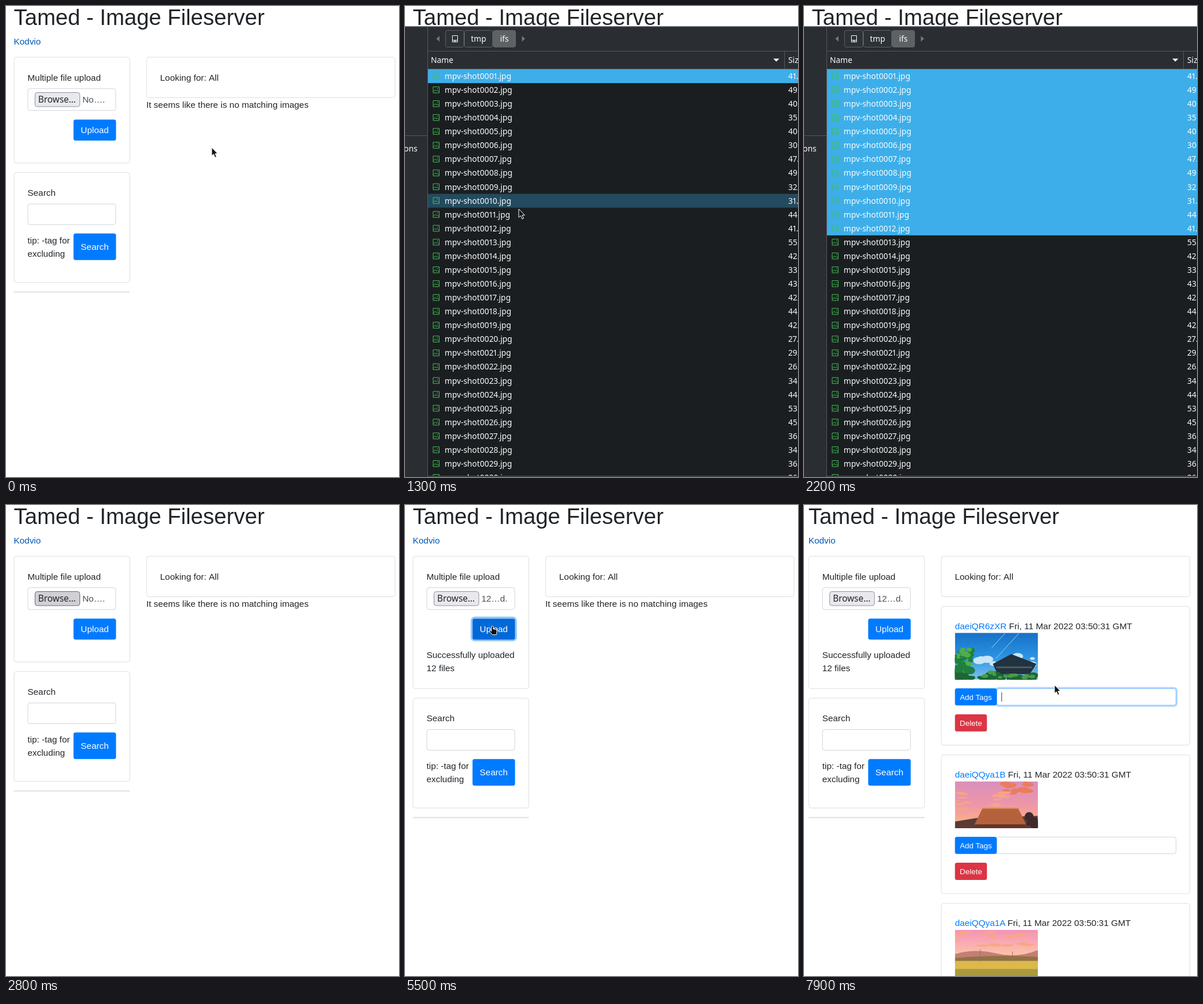
Animation, 684 px wide and 819 px high, one loop 8 s. Source, as an HTML page:

```html
<!DOCTYPE html>
<html lang="en">
<head>
<meta charset="utf-8">
<title>Image Fileserver</title>
<style>
  html, body { margin: 0; width: 100%; height: 100%; overflow: hidden; background: #fff; }
  svg { display: block; }
  text { font: 15.4px "Liberation Sans", Arial, sans-serif; fill: #212529; white-space: pre; }
  .title { font-size: 38.5px; }
  .small { font-size: 13.48px; }
  .white { fill: #fff; }
  .mid { text-anchor: middle; }
  .link { fill: #007bff; }
  .visited { fill: #0056b3; }
  .muted { fill: #495057; }
  .noto { font-family: "Noto Sans", sans-serif; }
  .dlg { font: 13.85px "Noto Sans", sans-serif; font-variant-numeric: proportional-nums; fill: #fcfcfc; }
</style>
</head>
<body>
<svg id="stage" width="684" height="819"></svg>
<script>
const LOOP = 8000, STEP = 100;
const ROWS = 30, ROW_TOP = 110, ROW_H = 24.07;
const CARD_PITCH = 258.2, THUMB_W = 144.4, THUMB_H = 81.5;
const LOAD_START = 5700, SCROLLBAR_SHIFT = -5.8, MESSAGE_H = 46.2;

let seed = 7;
const random = () => (seed = seed * 16807 % 2147483647) / 2147483647;

// --- markup helpers ---
const text = (x, y, str, cls = '', more = '') => `<text x="${x}" y="${y}" class="${cls}" ${more}>${str}</text>`;
const rect = (x, y, w, h, fill, more = '') =>
  `<rect x="${x}" y="${y}" width="${w}" height="${h}" fill="${fill}" ${more}/>`;
const path = (d, fill, more = '') => `<path d="${d}" fill="${fill}" ${more}/>`;
const line = (d, colour, width = 1) => path(d, 'none', `stroke="${colour}" stroke-width="${width}"`);
const group = (id, body) => `<g id="${id}">${body}</g>`;
const card = (x, y, w, h, more = '') => rect(x, y, w, h, '#fff', `rx="4" stroke="#dfdfdf" ${more}`);
const field = (x, y, w, h, more = '') => rect(x, y, w, h, '#fff', `rx="4" stroke="#ced4da" ${more}`);
const button = (x, y, w, h, label, fill, cls = '', id = '') =>
  rect(x, y, w, h, fill, `rx="3.5" id="${id}"`) +
  text(x + w / 2, Math.floor(y + h / 2 + 5.4), label, 'white mid ' + cls);

// --- thumbnails: gradient sky, seeded clouds and leaves, a few silhouettes ---
const sky = (id, ...stops) => `<linearGradient id="${id}" x2="0" y2="1">${
  stops.map((c, i) => `<stop offset="${i / (stops.length - 1)}" stop-color="${c}"/>`).join('')
}</linearGradient>` + rect(0, 0, THUMB_W, THUMB_H, `url(#${id})`);
const puffs = (count, x, y, w, h, size, flatness, colour) => Array.from({ length: count }, () => {
  const r = size * (.5 + random());
  return `<ellipse cx="${x + w * random()}" cy="${y + h * random()}" rx="${r}" ry="${r * flatness}" fill="${colour}"/>`;
}).join('');

const temple = sky('day', '#1670c8', '#2b92e0', '#7cc4ee') +
  line('M112 0L72 44M88 0L64 26', '#9fd4f5') +
  puffs(12, 28, 40, 116, 16, 8, .6, '#c9e6f8') +
  puffs(30, 0, 30, 30, 40, 6, .8, '#1f7f3c') + puffs(14, 0, 28, 28, 26, 4, .7, '#4fae4c') +
  path('M66 54L98 37 142 54 130 72H74Z', '#22323e') + line('M72 60H134', '#4a5c68', 3) +
  puffs(30, 0, 72, 144, 10, 8, .6, '#1d6636') + puffs(16, 20, 68, 120, 10, 4, .6, '#4a9c48');
const roof = sky('dusk', '#d98fbd', '#ee96a8', '#ffb87c') +
  puffs(12, 88, 2, 56, 20, 7, .4, '#ec7c5c') + puffs(16, 0, 18, 90, 32, 8, .2, '#f7a488') +
  path('M0 70L36 64 144 60V82H0Z', '#5c3a35') +
  path('M48 47H110L124 75H34Z', '#b5623c') + line('M47 47H111', '#d98a55', 2) +
  rect(38, 75, 84, 7, '#643529') + puffs(10, 126, 60, 18, 22, 6, 1, '#40282c');
const meadow = sky('rose', '#f492b8', '#fab0b0', '#fcd0a0', '#e8b48c') +
  puffs(22, 0, 3, 144, 28, 9, .16, '#f8a880') +
  path('M0 42Q36 32 72 41T145 35V58H0Z', '#c08074') +
  path('M0 49Q72 43 145 47V60H0Z', '#947048') +
  rect(0, 54, THUMB_W, 14, '#dcb84a') + rect(0, 68, THUMB_W, 14, '#aa9a3c') +
  line('M44 34V55M100 38V54', '#9b6b62');

// `reach` is the loaded height 700 ms after loading starts
const IMAGES = [
  { id: 'daeiQR6zXR', art: temple, reach: 49 },
  { id: 'daeiQQya1B', art: roof, reach: 59 },
  { id: 'daeiQQya1A', art: meadow, reach: 39 },
];

const result = ({ id, art }, i) => `<g transform="translate(0 ${i * CARD_PITCH})">` +
  card(244.8, 176.4, 432.4, 241.2) +
  text(268.5, 216, `<tspan class="link">${id}</tspan> Fri, 11 Mar 2022 03:50:31 GMT`) +
  `<svg id="image${i}" x="268.5" y="222.3" width="${THUMB_W}" height="0">${art}</svg>` +
  field(341.3, 319.2, 312, 29, `id="tags${i}"`) +
  button(268.5, 318.7, 72.8, 29.85, 'Add Tags', '#007bff', 'small') +
  button(268.5, 363.9, 55.7, 29.85, 'Delete', '#dc3545', 'small') + '</g>';

const page = group('page',
  text(13.5, 32.7, 'Tamed - Image Fileserver', 'title') +
  text(13.5, 67, 'Kodvio', 'visited') +
  card(14, 89, 201.5, 184, 'id="uploadCard"') +
  text(37.5, 130, 'Multiple file upload') +
  field(38, 143.7, 153, 38) +
  rect(50.5, 150.5, 78, 24.5, '#e9e9ed', 'id="browse" rx="4" stroke="#8f8f9d"') +
  text(56, 168, 'Browse…', 'noto') + text(133, 168, '', 'muted', 'id="fileLabel"') +
  rect(115.9, 195.7, 77.2, 39.8, 'none', 'id="uploadRing" rx="5.5" stroke="#93c7ff" stroke-width="3.2"') +
  button(117.5, 197.4, 74, 36.6, 'Upload', '#007bff', '', 'upload') +
  group('success', text(37.5, 266, 'Successfully uploaded') + text(37.5, 289, '12 files')) +
  group('search',
    card(14, 289.7, 201.5, 191) + text(37.5, 330, 'Search') + field(38, 344.2, 153, 36) +
    text(37.5, 413, 'tip: -tag for') + text(37.5, 436, 'excluding') +
    button(117.5, 395.6, 74, 46.2, 'Search', '#007bff') +
    rect(13.5, 496.4, 202, 1.9, '#dfdfdf')) +
  card(244.8, 89, 432.4, 70.5) + text(268.3, 130, 'Looking for:') + text(353, 130, 'All') +
  group('empty', text(244.3, 177, 'It seems like there is no matching images')) +
  group('results', IMAGES.map(result).join('') +
    rect(339.8, 317.7, 315, 32, 'none', 'id="tagRing" rx="5" stroke="#007bff" stroke-opacity=".25" stroke-width="3"') +
    rect(349.3, 326, 1, 16, '#333', 'id="caret"')));

const fileRow = (_, i) => {
  const y = ROW_TOP + i * ROW_H, size = (22 + 36 * random()).toFixed(1);
  return `<g transform="translate(48.5 ${y + 6})">` +
    line('M.5 .5H11V11H.5ZM1 9L4 5.5 6 8 8 6.5 11 9.5M7 3.5H9', '#40c057') + '</g>' +
    text(69, y + 17, `mpv-shot${String(i + 1).padStart(4, '0')}.jpg`, 'dlg') +
    text(667, y + 17, size + ' kB', 'dlg');
};
const pathButton = (x, w, fill, label = '') => rect(x, 42.5, w, 29, fill, 'rx="3" stroke="#5f6367"') +
  text(x + w / 2, 61.7, label, 'dlg mid');
const dialog = group('dialog',
  rect(0, 35.5, 684, 784, '#2a2e32') + rect(40, ROW_TOP, 644, 707, '#1b1e20') +
  rect(40, 0, 644, ROW_H, '#234a5e', 'id="hover"') + rect(40, ROW_TOP, 644, 0, '#3daee9', 'id="selection"') +
  Array.from({ length: ROWS }, fileRow).join('') + rect(0, 817, 684, 2, '#2a2e32') +
  line('M0 36H684M39.5 36V819M39.5 78.5H684M40 109.5H684M660.5 79V109M0 225.5H39M40 817.5H684', '#55595d') +
  path('M60 52V62L54.5 57ZM203.5 52V62L209 57Z', '#74777a') +
  pathButton(70.5, 32, '#2d3236') + pathButton(103.5, 49, '#2d3236', 'tmp') + pathButton(153.5, 39, '#5e6265', 'ifs') +
  line('M82.5 51.5H91.5V62.5H82.5ZM82.5 59.5H91.5M85 61H89', '#fcfcfc') +
  text(45, 99, 'Name', 'dlg') + text(667, 99, 'Size', 'dlg') +
  path('M641 91.5H651.5L646.2 96.8Z', '#fcfcfc') + text(-2, 253, 'ons', 'dlg'));

const outline = 'stroke="#fff" stroke-linejoin="round"';
const cursors = group('cursor',
  path('M0 0V14.5L3.4 11.6 5.8 17.4 8.4 16.3 6 10.7H10.3Z', '#111', `id="arrow" ${outline}`) +
  path('M-1.5 0Q0-2 1.5 0V4.5L7 6Q8.5 6.5 8 9L7 14.5H0L-4.5 9Q-5 7-3.5 7L-1.5 8.5Z', '#111', `id="hand" ${outline}`) +
  group('beam', line('M-3-8H3M0-8V8M-3 8H3', '#111', 1.3)));

stage.innerHTML = page + dialog + cursors;

// --- motion ---
const POINTER_LEGS = [
  { from: 0, to: 0, x: 358, y: 246 },
  { from: 0, to: 700, x: 95, y: 166 },      // Browse
  { from: 900, to: 1300, x: 198, y: 353 },
  { from: 1300, to: 1500, x: 205, y: 390 }, // last file of the selection
  { from: 1900, to: 2100, x: 290, y: 764 },
  { from: 3000, to: 3000, x: 613, y: 688 },
  { from: 3000, to: 3500, x: 160, y: 190 },
  { from: 3600, to: 4000, x: 152, y: 211 }, // Upload
  { from: 6500, to: 7300, x: 470, y: 332 }, // tag field
  { from: 7500, to: 7900, x: 436, y: 313 },
];

const easeOut = p => p * (2 - p);
function pointerAt(t) {
  let x = 0, y = 0;
  for (const leg of POINTER_LEGS) {
    if (t < leg.from) break;
    const p = t >= leg.to ? 1 : easeOut((t - leg.from) / (leg.to - leg.from));
    x += (leg.x - x) * p;
    y += (leg.y - y) * p;
  }
  return [x, y];
}

const el = id => document.getElementById(id);
const set = (id, attrs) => Object.entries(attrs).forEach(([k, v]) => el(id).setAttribute(k, v));
const show = (id, on) => { el(id).style.display = on ? '' : 'none'; };

function render(t) {
  const inDialog = t >= 700 && t < 2800, uploaded = t >= 5500, listed = t >= LOAD_START, typing = t >= 7500;
  const hasPointer = t < 2200 || t >= 3100;
  const shift = listed ? SCROLLBAR_SHIFT : 0;
  const [x, y] = pointerAt(t);
  const over = (left, top, right, bottom) => hasPointer && !inDialog &&
    x - shift > left && x - shift < right && y > top && y < bottom;

  const overBrowse = over(50, 150, 129, 175) || (t >= 2800 && t < 3100);
  const overUpload = over(117, 197, 192, 234);
  set('page', { transform: `translate(${shift} 0)` });
  set('browse', overBrowse ? { fill: '#d0d0d5', stroke: '#676774' } : { fill: '#e9e9ed', stroke: '#8f8f9d' });
  el('fileLabel').textContent = t < 2900 ? 'No….' : '12…d.';
  set('upload', { fill: overUpload ? '#0069d9' : '#007bff' });
  show('uploadRing', t >= 4100 && !typing);

  show('success', uploaded);
  set('uploadCard', { height: 184 + (uploaded ? MESSAGE_H : 0) });
  set('search', { transform: `translate(0 ${uploaded ? MESSAGE_H : 0})` });

  show('empty', !listed);
  show('results', listed);
  const loading = Math.max(0, t - LOAD_START) / 700;
  IMAGES.forEach(({ reach }, i) => set('image' + i, { height: Math.min(THUMB_H, reach * loading) }));
  set('tags0', { stroke: typing ? '#80bdff' : '#ced4da' });
  show('tagRing', typing);
  show('caret', typing);

  show('dialog', inDialog);
  show('hover', hasPointer);
  const hovered = Math.max(0, Math.floor((y - 3.5 - ROW_TOP) / ROW_H));
  set('hover', { y: ROW_TOP + hovered * ROW_H });
  set('selection', { height: ROW_H * (t < 1800 ? 1 : 12) });

  const shape = !hasPointer ? '' : overUpload ? 'hand' : listed && over(341, 319, 653, 348) ? 'beam' : 'arrow';
  set('cursor', { transform: `translate(${x} ${y})` });
  ['arrow', 'hand', 'beam'].forEach(id => show(id, id === shape));
}

const start = performance.now();
function frame() {
  const t = (performance.now() - start) % LOOP;
  render(Math.floor(t / STEP) * STEP);
  requestAnimationFrame(frame);
}
frame();
</script>
</body>
</html>
```
